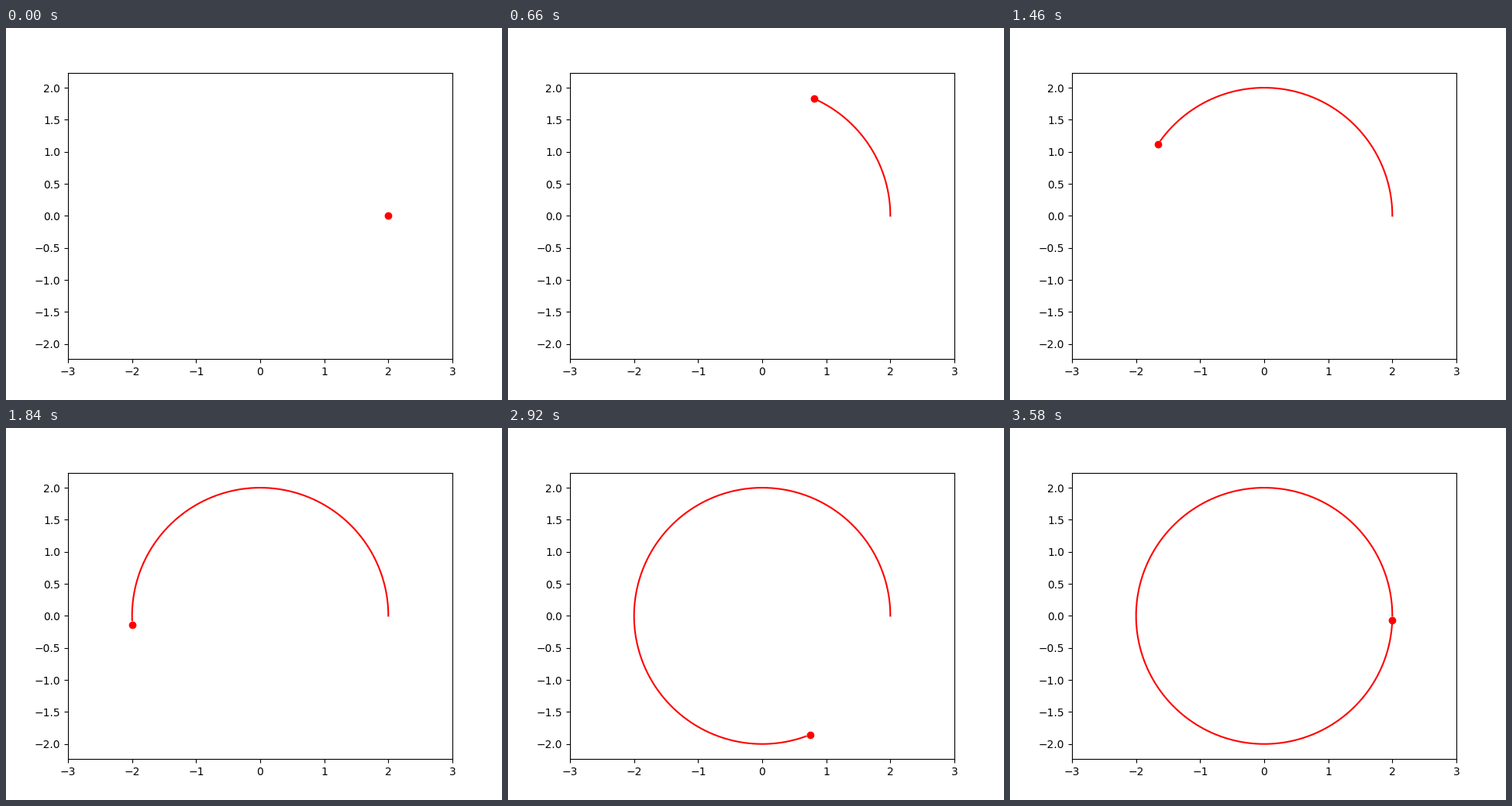
Write a matplotlib script that moves like this. It is 640x480 px and loops after 3600 ms.

```python
import numpy as np
import matplotlib.pyplot as plt
from matplotlib.animation import FuncAnimation

STEPS = 180
RADIUS = 2

angle = np.arange(STEPS) * 2 * np.pi / STEPS
xs, ys = RADIUS * np.cos(angle), RADIUS * np.sin(angle)

plt.rcParams["font.family"] = "DejaVu Sans"
fig, ax = plt.subplots(figsize=(6.4, 4.8), dpi=100)

# Equal units on both axes: the y range follows from the box shape.
box = ax.get_position()
half_height = 3 * (box.height * 4.8) / (box.width * 6.4)
ax.set_xlim(-3, 3)
ax.set_ylim(-half_height, half_height)

trail, = ax.plot([], [], "r-")
dot, = ax.plot([], [], "ro")


def update(i):
    # The trail ends one step behind the dot.
    trail.set_data(xs[:i], ys[:i])
    dot.set_data([xs[i]], [ys[i]])
    return trail, dot


anim = FuncAnimation(fig, update, frames=STEPS, interval=20,
                     repeat=True, repeat_delay=0)
plt.show()
```
